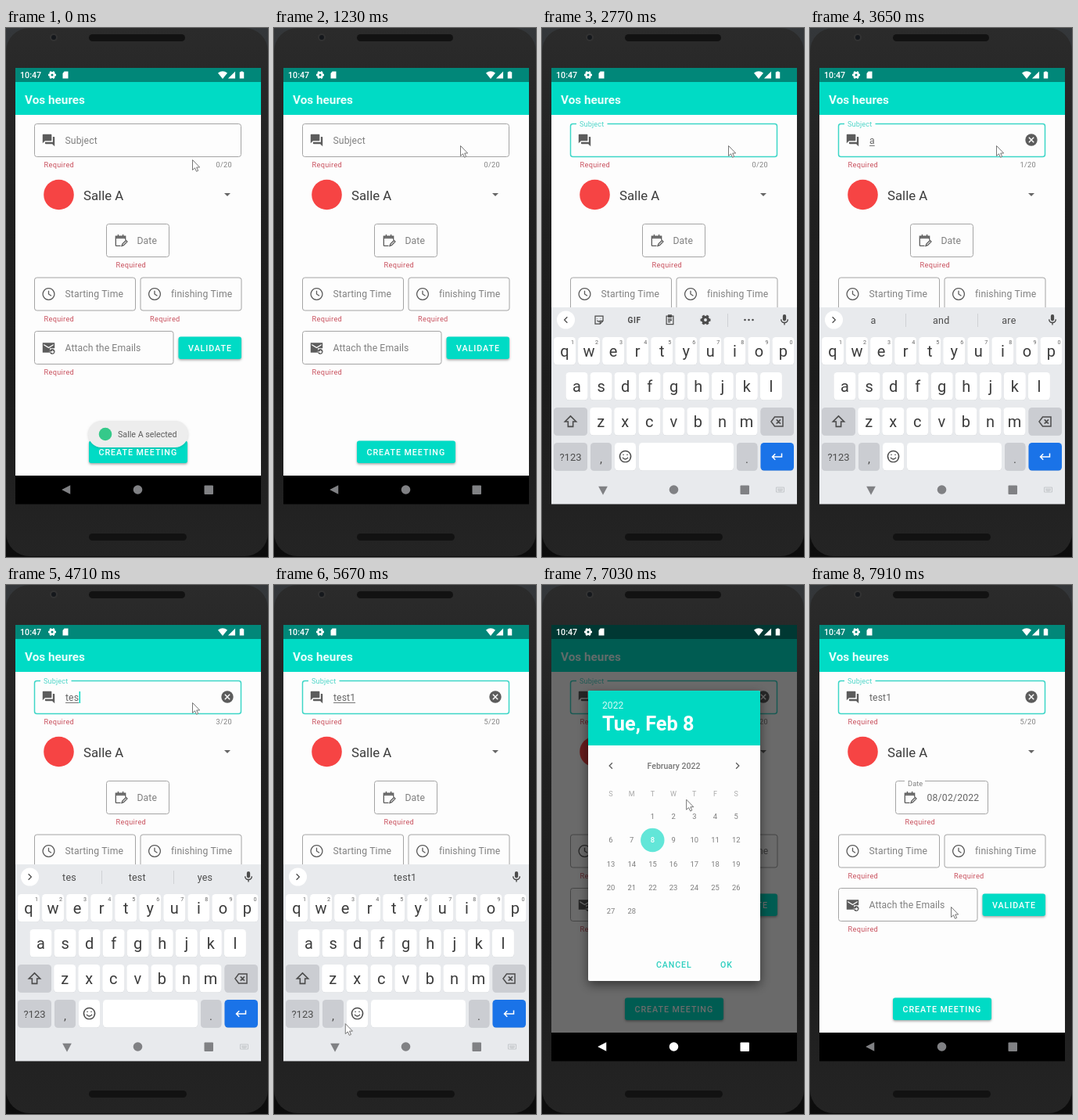
An HTML page with a canvas that plays this animation: 335 by 676 pixels, repeating every 7.99 s.

```html
<!DOCTYPE html>
<html lang="en">
<head>
<meta charset="utf-8">
<title>Meeting form</title>
<style>
html, body { margin: 0; width: 100%; height: 100%; overflow: hidden; background: #1c1c1c; }
canvas { display: block; width: 335px; height: 676px; }
</style>
</head>
<body>
<canvas id="stage"></canvas>
<script>
const LOOP = 7990;
const TEAL = '#00dbc5', GREY = '#808080', DARK = '#5c5c5c';
const canvas = document.getElementById('stage');
const c = canvas.getContext('2d');
const dpr = window.devicePixelRatio || 1;
canvas.width = 335 * dpr;
canvas.height = 676 * dpr;

// Typed text over time: [ms, text, suggestions]; null suggestions show the toolbar
const TYPING = [
  [0, '', null],
  [3170, 'a', ['a', 'and', 'are']],
  [3900, '', ['', '', '']],
  [4230, '', null],
  [4390, 't', ['t', 'the', 'to']],
  [4550, 'te', ['te', 'the', 'ten']],
  [4710, 'tes', ['tes', 'test', 'yes']],
  [4870, 'test', ['test', 'tests', 'testing']],
  [5110, 'test1', ['', 'test1', '']]
];
const CARET = [[2360, 2770], [2930, 3600], [3900, 5500], [5950, 6450]];
const POINTER = [
  [0, 238, 168], [1000, 238, 168], [1070, 238, 150], [5350, 238, 150],
  [5670, 91, 560], [5750, 73, 568], [5830, 66, 584], [6150, 66, 584],
  [6550, 172, 266], [6800, 172, 266], [7030, 184, 273], [7350, 234, 478],
  [7590, 234, 478], [7830, 180, 411]
];

const clamp = v => Math.min(1, Math.max(0, v));
const span = (t, a, b) => clamp((t - a) / (b - a));
const mix = (a, b, p) => a + (b - a) * p;
const smooth = p => p * p * (3 - 2 * p);

function text(s, x, y, size, color, { weight = 400, gap = 0, align = 'left' } = {}) {
  c.font = `${weight} ${size}px Roboto, sans-serif`;
  c.letterSpacing = gap + 'px';
  c.textAlign = align;
  c.fillStyle = color;
  c.fillText(s, x, y);
  return c.measureText(s).width;
}
function rect(x, y, w, h, color, r = 0) {
  c.beginPath();
  c.roundRect(x, y, w, h, r);
  c.fillStyle = color;
  c.fill();
}
function disc(x, y, r, color) {
  c.beginPath();
  c.arc(x, y, r, 0, 7);
  c.fillStyle = color;
  c.fill();
}
function fade(y0, y1, ...colors) {
  const g = c.createLinearGradient(0, y0, 0, y1);
  colors.forEach((color, i) => g.addColorStop(i / (colors.length - 1), color));
  return g;
}
// Draws a path made on a 24 unit grid, centred on x, y
function icon(d, x, y, size, color, line = 0) {
  c.save();
  c.translate(x, y);
  c.scale(size / 24, size / 24);
  c.translate(-12, -12);
  const p = new Path2D(d);
  c.strokeStyle = c.fillStyle = color;
  c.lineWidth = line;
  if (line) c.stroke(p); else c.fill(p, 'evenodd');
  c.restore();
}
function shadowed(blur, dy, alpha, draw) {
  c.save();
  c.shadowColor = `rgba(0,0,0,${alpha})`;
  c.shadowBlur = blur * dpr;
  c.shadowOffsetY = dy * dpr;
  draw();
  c.restore();
}

const FORUM = 'M21 6h-2v9H6v2q0 1 1 1h11l4 4V7q0-1-1-1zM17 12V3q0-1-1-1H3q-1 0-1 1v14l4-4h10q1 0 1-1z';
const CLOCK = 'M12 2.5a9.5 9.5 0 1 0 .01 0M12 6.5V12l4.5 3';
const CALENDAR = 'M12 21H5q-1 0-1-1V5h16v6M4 8h16M4 6h16M8 2v4M16 2v4M14 21l1-3 6-6 2 2-6 6z';
const MAIL = 'M2 4h20v9h-8v7H2zM4 6v2l8 5 8-5V6l-8 5zM18 14a4.500 4.500 0 1 0 .01 0zM18 16l3 3-3 3v-2h-3v-2h3z';
const SHIFT = 'M12 3L3 12h5v8h8v-8h5z';
const BACKSPACE = 'M8 4h14v16H8L2 12zM11 8.500l7 7M18 8.500l-7 7';
const SMILEY = 'M12 2a10 10 0 1 0 .01 0M7 14q5 6 10 0M8.500 8v2M15.500 8v2';
const ENTER = 'M20 6v6H5M9 7l-5 5 5 5';
const MIC = 'M9 5a3 3 0 0 1 6 0v6a3 3 0 0 1-6 0zM5 11h2a5 5 0 0 0 10 0h2q0 6-6 7v3h-2v-3q-6-1-6-7z';
const STICKER = 'M4 4h16v10l-6 6H4zM14 20v-6h6M8 9v1M15 9v1M8 13q3 4 5 1';
const CLIPBOARD = 'M5 4h14v17H5zM9 2h6v4H9zM8 10h8M8 13h8M8 16h5';
const KEYS = 'M2 6h20v12H2zM5 10h14M5 13h14M8 16h8';
const CHEVRON = { left: 'M15 6l-6 6 6 6', right: 'M9 6l6 6-6 6' };

function gear(x, y, r, color) {
  c.strokeStyle = color;
  c.lineWidth = r * .5;
  c.beginPath();
  c.arc(x, y, r * .55, 0, 7);
  c.stroke();
  for (let i = 0; i < 6; i++) {
    const a = i * Math.PI / 3;
    c.beginPath();
    c.moveTo(x + Math.cos(a) * r * .7, y + Math.sin(a) * r * .7);
    c.lineTo(x + Math.cos(a) * r, y + Math.sin(a) * r);
    c.stroke();
  }
}

function phone() {
  rect(0, 0, 335, 676, fade(0, 676, '#34373a', '#222', '#0c0c0c'));
  rect(0, 0, 335, 675, fade(0, 675, '#2b2b2b', '#202020', '#1c1c1c', '#242424'), 30);
  rect(106, 8, 123, 9, '#121212', 4.5);
  rect(106, 646, 125, 9, '#121212', 4.5);
  disc(61, 12, 5, '#333');
  disc(61, 12, 3, '#15181c');
}

function appBar() {
  rect(12, 51, 314, 18, '#018779');
  rect(12, 69, 314, 42, TEAL);
  text('Vos heures', 24, 97, 15.3, '#e9fffc', { weight: 700 });
}

function status() {
  text('10:47', 18, 64, 10.7, '#fff', { weight: 500 });
  gear(59, 60, 5, '#fff');
  icon('M9 3h10v18H5V8z', 76, 60, 12, '#fff');
  icon('M0 7Q12-2 24 7L12 22z', 277, 60, 12, '#fff');
  icon('M22 2v20H2z', 288.5, 60, 11, '#fff');
  icon('M9 2h6v2h3v18H6V4h3z', 301.5, 60, 11, '#fff');
}

// float moves the label from inside the box to its top edge
function field(x, y, w, label, draw, { float = 0, focus = false, lx = 12, ly = 4 } = {}) {
  c.beginPath();
  c.roundRect(x + .5, y + .5, w - 1, 42, 3);
  c.strokeStyle = focus ? '#3cd6c7' : '#a4a4a4';
  c.lineWidth = focus ? 1.5 : 1;
  c.stroke();
  draw(x + 18.5, y + 21.5);
  const size = mix(12.2, 9.2, float);
  if (float > .5) rect(x + lx - 4, y - 2, label.length * 4.5 + 8, 5, '#fdfdfd');
  text(label, mix(x + 39.5, x + lx, float), mix(y + 25.5, y + ly, float), size, focus ? '#4fd6c9' : GREY, { gap: .1 });
  text('Required', x + 12.5, y + 56, 9.2, '#c9525f', { gap: .3 });
}
const glyph = (d, line) => (x, y) => icon(d, x, y, 18.5, DARK, line);

function button(label, x, y, w) {
  shadowed(3, 1.5, .35, () => rect(x, y, w, 28.5, TEAL, 3));
  text(label, x + 12.5, y + 18.3, 10.7, '#fff', { weight: 500, gap: .95 });
}

function form(t, typed) {
  rect(12, 111, 314, 461, '#fdfdfd');
  const focus = t >= 1640;
  field(36, 122, 265, 'Subject', glyph(FORUM), { float: smooth(span(t, 1640, 1800)), focus });
  const width = text(typed, 76, 147.5, 12.2, '#666', { gap: .1 });
  if (typed) {
    if (t < 5870) rect(76, 150, width, 1, '#777');
    disc(283, 143, 7.7, DARK);
    icon('M7.500 7.500l9 9M16.500 7.500l-9 9', 283, 143, 17, '#fff', 2);
  }
  if (CARET.some(([a, b]) => t >= a && t < b)) rect(76.5 + width, 136, 1.5, 15, TEAL);
  text(typed.length + '/20', 289, 178, 9.2, GREY, { gap: .3, align: 'right' });

  disc(67.5, 213, 19.3, '#f64444');
  text('Salle A', 99, 220, 16.8, '#3c3c3c');
  icon('M0 6h24L12 18z', 283, 213, 8, '#666');

  if (t < 7590) field(128, 250, 81, 'Date', glyph(CALENDAR, 1.7));
  else {
    field(109, 250, 119, 'Date', glyph(CALENDAR, 1.7), { float: 1, lx: 16, ly: 7 });
    text('08/02/2022', 149.5, 276, 12.2, '#666', { gap: .2 });
  }
  field(36, 318.5, 130, 'Starting Time', glyph(CLOCK, 1.7));
  field(171.5, 318.5, 130, 'finishing Time', glyph(CLOCK, 1.7));
  field(36, 387, 178.5, 'Attach the Emails', glyph(MAIL));
  button('VALIDATE', 220.5, 394.5, 80.5);
  button('CREATE MEETING', 106, 527.5, 126);
}

function toast(t) {
  c.globalAlpha = 1 - span(t, 620, 900);
  if (c.globalAlpha > 0) {
    shadowed(3, 1, .15, () => rect(105, 502, 128, 34, '#ededed', 17));
    disc(127, 519, 8.3, '#35c98a');
    text('Salle A selected', 143, 523, 10.7, DARK);
  }
  c.globalAlpha = 1;
}

function key(x, y, w, color = '#fff') {
  rect(x, y + 1, w, 35, '#d0d3d7', 4.5);
  rect(x, y, w, 35.5, color, 4.5);
}
function letters(row, x, y) {
  [...row].forEach((ch, i) => {
    const cx = x + i * 31.05;
    key(cx - 14, y, 28);
    text(ch, cx, y + 24.5, 20, '#3c3c3c', { align: 'center' });
  });
}

function keyboard(words) {
  const shade = '#cbcdd2', ink = '#4c4c4c';
  rect(12, 357, 314, 252, '#e8eaed');
  disc(30.5, 373, 11.5, '#fff');
  icon(words ? CHEVRON.right : CHEVRON.left, 30.5, 373, 15, ink, 2);
  icon(MIC, 310, 373, 17, ink);
  if (words) {
    words.forEach((s, i) => text(s, 81 + i * 86.7, 378, 12.5, ink, { align: 'center', gap: .2 }));
    if (words[0]) [122, 214].forEach(x => rect(x, 365, 1, 17, '#cfd1d5'));
  } else {
    icon(STICKER, 73, 373, 15, ink, 2);
    text('GIF', 118, 377, 10, ink, { weight: 700, gap: .6, align: 'center' });
    icon(CLIPBOARD, 163.5, 373, 15, ink, 2);
    gear(209, 373, 6.5, ink);
    rect(237, 365, 1, 17, '#cfd1d5');
    [259.5, 264.5, 269.5].forEach(x => disc(x, 373, 1.3, ink));
  }

  letters('qwertyuiop', 29, 395);
  [...'1234567890'].forEach((n, i) => text(n, 39 + i * 31.05, 404, 7.2, '#666', { align: 'center' }));
  letters('asdfghjkl', 44.5, 440);
  letters('zxcvbnm', 75.2, 485);
  key(15, 485, 43, shade);
  icon(SHIFT, 36.5, 503, 19, ink, 2);
  key(279.5, 485, 42.5, shade);
  icon(BACKSPACE, 300.5, 503, 18, ink, 2);

  key(15, 530, 43, shade);
  text('?123', 36.5, 553, 13, ink, { align: 'center' });
  key(62, 530, 27, shade);
  text(',', 75.5, 556, 15, ink, { align: 'center' });
  key(93, 530, 27);
  icon(SMILEY, 106.5, 547.5, 17, ink, 2);
  key(124, 530, 121);
  key(249, 530, 26.5, shade);
  text('.', 262, 556, 15, ink, { align: 'center' });
  key(279.5, 530, 42.5, '#1a73e8');
  icon(ENTER, 300.5, 548, 18, '#fff', 2);
}

function navigation(color, turn, keys) {
  c.save();
  c.translate(78, 590);
  c.rotate(-turn * Math.PI / 2);
  icon('M2 12L21 2v20z', -1, 0, 14, color);
  c.restore();
  disc(168.5, 590, 5.8, color);
  rect(253.5, 584.5, 11.5, 11.5, color, 1);
  if (keys) icon(KEYS, 304.5, 590, 12, '#c0c3c7', 1.8);
}

function calendar() {
  shadowed(14, 5, .5, () => rect(59, 135, 220, 371, '#fdfdfd', 2));
  rect(59, 135, 220, 70, TEAL, [2, 2, 0, 0]);
  text('2022', 77, 158, 12, '#d8fbf6', { gap: .1 });
  text('Tue, Feb 8', 77, 185.5, 25.3, '#fff', { weight: 700 });
  text('February 2022', 168.5, 235, 10.5, '#777', { weight: 500, align: 'center' });
  icon(CHEVRON.left, 88, 231, 15, DARK, 2);
  icon(CHEVRON.right, 250, 231, 15, DARK, 2);
  const col = i => 88 + i * 26.7;
  [...'SMTWTFS'].forEach((d, i) => text(d, col(i), 269.5, 9, '#aaa', { align: 'center' }));
  disc(141.3, 326, 15.2, '#62e6d8');
  for (let day = 1; day <= 28; day++) {
    const i = day + 1;
    text(day, col(i % 7), 299 + Math.floor(i / 7) * 30.3, 9.4, day === 8 ? '#fff' : '#7c7c7c',
      { align: 'center', weight: day === 8 ? 500 : 400 });
  }
  text('CANCEL', 146, 489, 10.6, '#2ccfbf', { weight: 500, gap: .9 });
  text('OK', 228, 489, 10.6, '#2ccfbf', { weight: 500, gap: .9 });
}

function pointer(t) {
  let i = POINTER.findIndex(p => p[0] > t);
  if (i < 0) i = POINTER.length;
  const a = POINTER[i - 1], b = POINTER[i] || a;
  const p = a === b ? 0 : span(t, a[0], b[0]);
  c.save();
  c.translate(mix(a[1], b[1], p), mix(a[2], b[2], p));
  const shape = new Path2D('M.5 .5v13l3-2.700 2 4.500 2.200-1-2-4.300h4z');
  c.fillStyle = '#fff';
  c.fill(shape);
  c.lineWidth = 1;
  c.strokeStyle = '#777';
  c.stroke(shape);
  c.restore();
}

function draw(t) {
  const [, typed, words] = TYPING.findLast(s => t >= s[0]);
  c.setTransform(dpr, 0, 0, dpr, 0, 0);
  phone();
  c.save();
  c.beginPath();
  c.rect(12, 51, 314, 557.5);
  c.clip();
  form(t, typed);
  appBar();
  toast(t);

  const dialog = span(t, 6790, 6990) * (1 - span(t, 7590, 7750));
  if (dialog > 0) {
    rect(12, 51, 314, 521, `rgba(0,0,0,${.58 * dialog})`);
    c.globalAlpha = dialog;
    calendar();
    c.globalAlpha = 1;
  }
  status();

  rect(12, 572, 314, 37, '#000');
  const rise = (1 - span(t, 1760, 2030)) ** 2;
  const drop = span(t, 5830, 6040) ** 2;
  const hidden = Math.max(rise, drop);
  if (hidden < 1) {
    c.save();
    c.translate(0, 252 * hidden);
    keyboard(words);
    c.restore();
  }
  const bright = t > 5950 && t < 7670;
  const turn = span(t, 2040, 2200) * (1 - span(t, 5830, 5990));
  navigation(bright ? '#fff' : '#808184', turn, hidden < .2);
  c.restore();
  pointer(t);
}

const start = performance.now();
function tick() {
  draw((performance.now() - start) % LOOP);
  requestAnimationFrame(tick);
}
tick();
</script>
</body>
</html>
```
